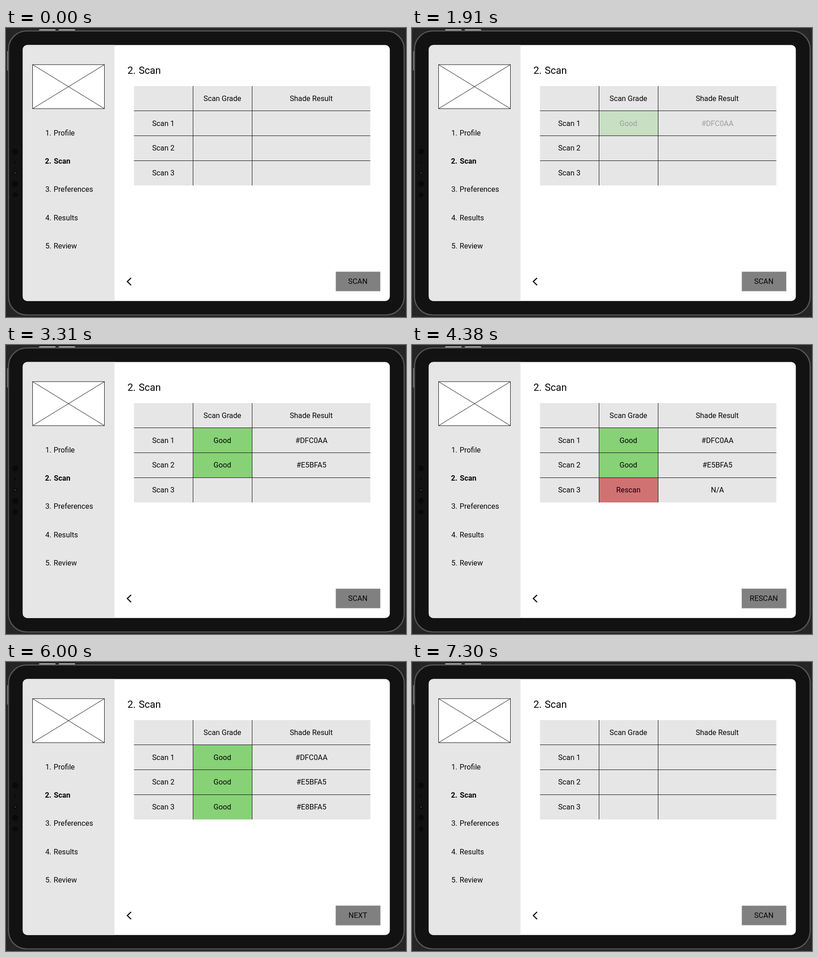
An HTML page for the animation above (7.84 s loop, 880 px wide and 637 px high).

```html
<!DOCTYPE html>
<html lang="en">
<head>
<meta charset="utf-8">
<title>Scan flow</title>
<style>
  html, body { margin: 0; width: 100%; height: 100%; overflow: hidden; background: #252525; }
  svg { display: block; width: 880px; height: 637px; }
  text { font: 16.3px Roboto, sans-serif; fill: #050505; }
  .mid text { text-anchor: middle; }
  .title text { font-size: 22px; }
  .bold text { font-weight: 700; }
  .panel { fill: #e6e6e6; }
  .line { fill: none; stroke: #111; stroke-width: 1; }
  .good { fill: #87d177; }
  .bad { fill: #d07272; }
  .button { fill: #808080; stroke: #a2a2a2; stroke-width: .6; }

  /* Each dissolve moves in a few eased, held steps. */
  .four, .five { animation-duration: 7840ms; animation-iteration-count: infinite; }
  .four { animation-timing-function: linear(.32 0% 33.3%, .66 33.3% 66.6%, .9 66.6% 100%, 1 100%); }
  .five { animation-timing-function: linear(.3 0% 25%, .6 25% 50%, .82 50% 75%, .95 75% 100%, 1 100%); }
  #scan1 { animation-name: scan1; }
  #scan2 { animation-name: scan2; }
  #rescan { animation-name: rescan; }
  #scan3 { animation-name: scan3; }
  #results { animation-name: clear; }
  @keyframes scan1 { 0%, 24.362% { opacity: 0; } 27.679%, 100% { opacity: 1; } }
  @keyframes scan2 { 0%, 38.01% { opacity: 0; } 42.219%, 100% { opacity: 1; } }
  @keyframes rescan { 0%, 52.934% { opacity: 0; } 55.867%, 100% { opacity: 1; } }
  @keyframes scan3 { 0%, 72.704% { opacity: 0; } 76.531%, 100% { opacity: 1; } }
  @keyframes clear { 0%, 88.903% { opacity: 1; } 93.112%, 100% { opacity: 0; } }
</style>
</head>
<body>
<svg viewBox="0 0 880 637">
  <defs>
    <rect id="grade" x="411" y="0" width="130.5" height="55"/>
    <rect id="shade" class="panel" x="541.5" y="0" width="260" height="55"/>
    <rect id="button" class="button" x="725.8" y="537.2" width="97.4" height="42.8"/>
  </defs>

  <!-- tablet -->
  <rect width="880" height="637" fill="#252525"/>
  <g fill="#c4c4c4">
    <rect x="73" y="3" width="36" height="2.5" rx="1"/>
    <rect x="116" y="3" width="36" height="2.5" rx="1"/>
    <rect x="2.5" y="51" width="2" height="43" rx="1" fill="#8a8a8a"/>
  </g>
  <rect x="5.5" y="6.5" width="870.5" height="626" rx="40" fill="#121212" stroke="#565656" stroke-width="2.6"/>
  <g fill="#090909">
    <circle cx="20" cy="272" r="6.5"/>
    <circle cx="20" cy="296" r="2"/>
    <circle cx="20" cy="319.5" r="4"/>
    <circle cx="20" cy="343.5" r="6.5"/>
    <circle cx="20" cy="368" r="5.5"/>
    <circle cx="20" cy="319.5" r="2" fill="#173a63"/>
  </g>
  <rect x="36.8" y="37.6" width="807.6" height="564.2" rx="10" fill="#fff"/>
  <path class="panel" d="M238.7 37.6H46.8a10 10 0 0 0-10 10V591.8a10 10 0 0 0 10 10H238.7Z"/>

  <!-- sidebar -->
  <rect class="line" x="58.5" y="80.8" width="158" height="97" style="fill:#fff"/>
  <path class="line" d="M58.5 80.8l158 97M216.5 80.8l-158 97"/>
  <g><text x="86.4" y="236.5">1.</text><text x="104.7" y="236.5">Profile</text></g>
  <g class="bold"><text x="85.7" y="298.8">2.</text><text x="105.3" y="298.8">Scan</text></g>
  <g><text x="86.4" y="361.2">3.</text><text x="104.7" y="361.2">Preferences</text></g>
  <g><text x="86.4" y="423.5">4.</text><text x="104.7" y="423.5">Results</text></g>
  <g><text x="86.4" y="485.8">5.</text><text x="104.7" y="485.8">Review</text></g>

  <!-- page -->
  <g class="title"><text x="267.2" y="101.3">2.</text><text x="292" y="101.3">Scan</text></g>
  <path d="M275.2 550.8L266.8 558.8L275.2 566.8" fill="none" stroke="#080808" stroke-width="2.3"/>
  <rect class="panel" x="281.5" y="128" width="520" height="219"/>

  <g class="mid">
    <text x="476" y="160.8">Scan Grade</text>
    <text x="671.5" y="160.8">Shade Result</text>
    <text x="346" y="215.6">Scan 1</text>
    <text x="346" y="270.4">Scan 2</text>
    <text x="346" y="325.3">Scan 3</text>
    <use href="#button"/>
    <text x="774" y="564.3">SCAN</text>

    <g id="results" class="five">
      <g id="scan1" class="four">
        <use href="#grade" y="182.5" class="good"/>
        <text x="476" y="215.6">Good</text>
        <text x="672" y="215.6">#DFC0AA</text>
      </g>
      <g id="scan2" class="five">
        <use href="#grade" y="237.3" class="good"/>
        <text x="476" y="270.4">Good</text>
        <text x="672" y="270.4">#E5BFA5</text>
      </g>
      <g id="rescan" class="four">
        <use href="#grade" y="292" class="bad"/>
        <text x="476" y="325.3">Rescan</text>
        <text x="672" y="325.3">N/A</text>
        <use href="#button"/>
        <text x="774" y="564.3">RESCAN</text>
      </g>
      <g id="scan3" class="five">
        <use href="#grade" y="292" class="good"/>
        <use href="#shade" y="292"/>
        <text x="476" y="325.3">Good</text>
        <text x="672" y="325.3">#E8BFA5</text>
        <use href="#button"/>
        <text x="774" y="564.3">NEXT</text>
      </g>
    </g>
  </g>
  <path class="line" d="M281.5 182.5h520m-520 55h520m-520 55h520M411.5 128v219M541.5 128v219"/>
</svg>
</body>
</html>
```
